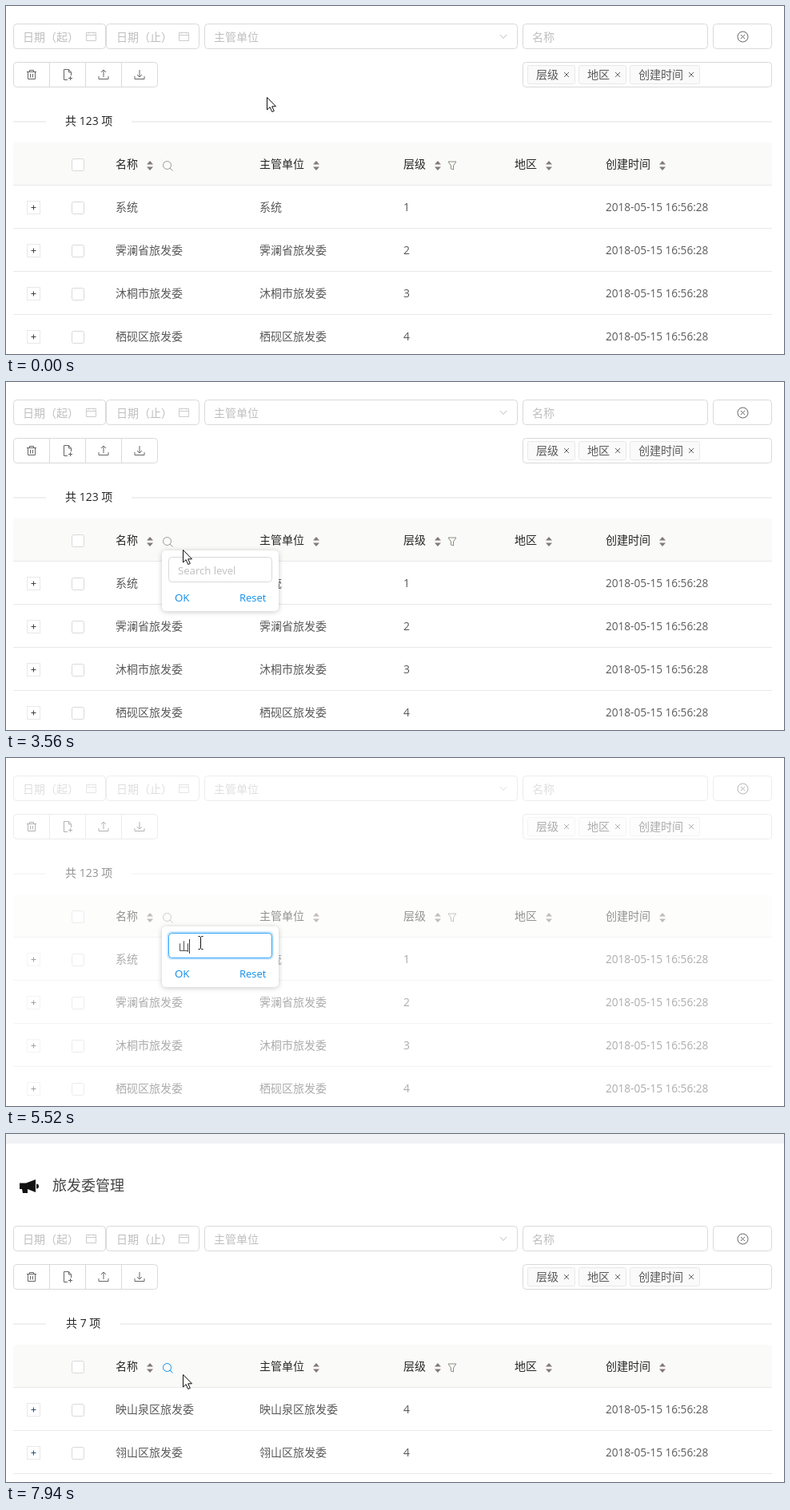
An HTML page that plays this animation: 973 by 436 pixels, repeating every 8000 ms.

```html
<!DOCTYPE html>
<html lang="zh-CN">
<head>
<meta charset="utf-8">
<title>Table search</title>
<style>
html, body { margin: 0; width: 100%; height: 100%; overflow: hidden; background: #fff; }
svg { display: block; width: 100%; height: 100%; }
text { font-family: "Open Sans", "Noto Sans CJK SC", "Noto Sans CJK", sans-serif; white-space: pre; }
.popup { filter: drop-shadow(0 1px 3px rgba(0, 0, 0, .22)); }
</style>
</head>
<body>
<svg id="stage" viewBox="0 0 973 436"></svg>
<script>
const LOOP = 8000, TICK = 110, SHIFT = 93;
const BORDER = '#d9d9d9', LINE = '#e8e8e8', HINT = '#bfbfbf', BODY = '#595959', DARK = '#262626', BLUE = '#108ee9';

const text = (x, cy, str, fill = BODY, size = 14) =>
  `<text x="${x}" y="${Math.round(cy + size * .36)}" fill="${fill}" font-size="${size}">${str}</text>`;
const rect = (x, y, w, h, fill, extra = '') =>
  `<rect x="${x}" y="${y}" width="${w}" height="${h}" fill="${fill}" ${extra}/>`;
const box = (x, y, w, h, r = 4, stroke = BORDER, fill = '#fff') =>
  rect(x + .5, y + .5, w - 1, h - 1, fill, `rx="${r}" stroke="${stroke}"`);
const icon = (x, y, d, stroke = '#666', fill = 'none') =>
  `<path transform="translate(${x} ${y})" d="${d}" fill="${fill}" stroke="${stroke}"/>`;
const group = (id, content, extra = '') => `<g id="${id}" ${extra}>${content}</g>`;
const circle = r => `M${-r} 0a${r} ${r} 0 1 0 ${2 * r} 0a${r} ${r} 0 1 0 ${-2 * r} 0`;
const cross = r => `M${-r} ${-r}L${r} ${r}M${r} ${-r}L${-r} ${r}`;

const calendar = x => icon(x, 38.5, 'M-6-5H6V5H-6ZM-6-2H6M-3-6V-4M3-6V-4', '#ccc');
const sorter = x => icon(x, 200, 'M-4-1.5L0-6L4-1.5ZM-4 1.5L0 6L4 1.5Z', 'none', '#84787c');

function toolbar() {
  const tags = [[652, 60, '层级'], [716, 60, '地区'], [780, 88, '创建时间']];
  return box(9, 22, 116, 32) + box(125, 22, 117, 32) + box(248, 22, 392, 32) +
    box(646, 22, 232, 32) + box(884, 22, 74, 32) +
    text(21, 38.5, '日期（起）', HINT) + text(138, 38.5, '日期（止）', HINT) +
    text(260, 38.5, '主管单位', HINT) + text(658, 38.5, '名称', HINT) +
    calendar(106.5) + calendar(222.5) + icon(622, 38, 'M-4-2L0 2.5L4-2', HINT) +
    icon(921.5, 38.5, circle(6.5) + cross(2.5)) +
    box(9, 70, 181, 32) + [54, 99, 144].map(x => rect(x, 71, 1, 30, BORDER)).join('') +
    icon(32, 86, 'M-6-3.5H6M-2.5-3.5V-5.5H2.5V-3.5M-4.5-3.5V5.5H4.5V-3.5M-1.5-1V3.5M1.5-1V3.5') +
    icon(77, 86, 'M0 6.5H-4.5V-6.5H1.5L4.5-3V1M1.5-6.5V-3H4.5M3.5 2V7M1 4.5H6') +
    icon(122, 86, 'M-6 2V5.5H6V2M0 3V-6M-3-3L0-6L3-3') +
    icon(167, 86, 'M-6 2V5.5H6V2M0 3V-6M-3 0L0 3L3 0') +
    box(646, 70, 312, 32) + tags.map(([x, w, label]) =>
      box(x, 74, w, 24, 2, LINE, '#fafafa') + text(x + 11, 86, label) +
      icon(x + w - 11, 86, cross(3))).join('');
}

function table(id, rows, searchColor, plusColor) {
  const heads = [[137, '名称', 180], [317, '主管单位', 388], [497, '层级', 540], [636, '地区', 679], [750, '创建时间', 821]];
  const checkbox = cy => box(82, cy - 8, 16, 16, 2);
  return `<path d="M9 224V175a4 4 0 0 1 4-4H954a4 4 0 0 1 4 4V224Z" fill="#fafaf9"/>` +
    rect(9, 224, 949, 1, LINE) + checkbox(199) +
    heads.map(([x, label, sortX]) => text(x, 198, label, DARK) + sorter(sortX)).join('') +
    icon(201.5, 199.5, circle(5) + 'M3.5 3.5L7 7', searchColor) +
    icon(558, 200, 'M-5-5H5L1.5 0V5L-1.5 4V0Z', '#8d8d80') +
    rows.map(([name, level], i) => {
      const cy = 252 + 54 * i;
      return rect(9, cy - 27, 949, 53, '#e6f9ff', `id="${id}${i}" opacity="0"`) +
        rect(9, cy + 26, 949, 1, LINE) +
        box(26, cy - 8, 17, 17, 0, LINE) + icon(34.5, cy + .5, 'M-3 0H3M0-3V3', plusColor) +
        checkbox(cy + 1) + text(137, cy, name) + text(317, cy, name) +
        text(497, cy, level) + text(750, cy, '2018-05-15 16:56:28', BODY, 13.6);
    }).join('');
}

const summary = (label, x, end) => rect(9, 144, 41, 2, '#f0f0f0') +
  rect(end, 144, 958 - end, 2, '#f0f0f0') + text(x, 144, label, DARK);

const fullPage = group('full', toolbar() + summary('共 123 项', 74, 157) + table('row',
  [['系统', 1], ['霁澜省旅发委', 2], ['沐桐市旅发委', 3], ['栖砚区旅发委', 4]], '#999', '#444'));

const foundPage = group('found',
  rect(0, 0, 973, 12, '#f0f2f5') +
  `<path d="M17 61.5H25L37 57V73L27 69V74H21L20 69H17ZM38 62.5a3 3 0 0 1 0 6Z" fill="#111"/>` +
  text(58, 65, '旅发委管理', '#444', 18) +
  group('foundBody', toolbar() + summary('共 7 项', 75, 143) + table('match',
    [['映山泉区旅发委', 4], ['翎山区旅发委', 4]], BLUE, '#2a5580'), `transform="translate(0 ${SHIFT})"`));

const popup = group('popup',
  `<rect class="popup" x="195" y="211" width="146" height="76" rx="5" fill="#fff"/>` +
  group('ring', rect(202, 218, 132, 34, 'none', 'rx="5" stroke="#1890ff" stroke-opacity=".2" stroke-width="2"')) +
  box(203, 219, 130, 32) + group('focus', box(203, 219, 130, 32, 4, '#30a3f5')) +
  group('hint', text(215, 236.5, 'Search level', HINT, 13.15)) +
  group('typed', text(215.5, 236, '山')) +
  rect(215, 227, 1, 18, '#333', 'id="caret"') +
  text(211, 270.5, 'OK', BLUE, 13.3) + text(292, 270.5, 'Reset', BLUE, 13));

const candidates = [[250, '山'], [310, '闪'], [370, '删'], [430, '善'], [490, 'Shadoun'], [605, '扇'], [665, '珊']];
const ime = group('ime', box(233, 248, 521, 44, 0, '#555') + rect(233, 248, 61, 44, '#5b6c61') +
  candidates.map(([x, word], i) =>
    text(x, 271.5, i + 1, i ? '#777' : '#e4e8e5', 12.5) +
    text(x + 11, 270.5, word, i ? '#111' : '#fff', 17)).join('') +
  rect(709, 249, 1, 42, '#555') +
  icon(731.5, 270, circle(8) + 'M-4.5 2Q0 7.5 4.5 2M-3-3.5V-1.5M3-3.5V-1.5', '#222'));

const pointer = group('pointer',
  group('arrow', icon(.5, .5, 'M0 0V15.5L3.6 12.2L6.2 18L8.8 17L6.2 11.3H11Z', '#111', '#fff')) +
  group('beam', icon(.5, .5, 'M-3-8H-1L0-7L1-8H3M0-7V7M-3 8H-1L0 7L1 8H3', '#111')));

document.getElementById('stage').innerHTML = fullPage + foundPage + popup + pointer + ime;

// time, x, y of the mouse hot spot
const path = [
  [230, 326, 114], [1010, 233, 190], [1130, 225, 205], [1220, 215, 235], [1380, 203, 280],
  [1650, 190, 311], [1690, 190, 311], [1890, 188, 324], [2010, 190, 318], [2110, 192, 278],
  [2230, 200, 224], [2430, 209, 209], [2650, 208, 208], [2840, 201, 203], [2980, 207, 208],
  [3200, 214, 209], [3520, 221, 210], [3580, 221, 210], [3970, 243, 231], [6270, 243, 231],
  [6610, 243, 185], [6930, 243, 185], [7700, 228, 251], [7920, 221, 301]];

const clamp = v => Math.max(0, Math.min(1, v));
const within = (t, from, to) => t >= from && t < to;
const fade = (t, on, off, length) => clamp((t - on) / length) * (1 - clamp((t - off) / length));

function mouseAt(t) {
  const next = path.findIndex(p => p[0] > t);
  if (next === 0) return path[0].slice(1);
  if (next < 0) return path[path.length - 1].slice(1);
  const [a, b] = [path[next - 1], path[next]];
  const k = (t - a[0]) / (b[0] - a[0]);
  return [1, 2].map(i => Math.round(a[i] + (b[i] - a[i]) * k));
}

const el = id => document.getElementById(id);
const show = (id, on) => el(id).setAttribute('display', on ? 'inline' : 'none');
const opacity = (id, v) => el(id).setAttribute('opacity', v);

function render(t) {
  const tick = t < 230 ? 0 : 230 + Math.floor((t - 230) / TICK) * TICK;
  const found = t >= 5620, typed = t >= 5400;
  const loading = within(t, 5510, 5840) ? .5 : 1;
  show('full', !found);
  show('found', found);
  opacity('full', loading);
  opacity('foundBody', loading);
  opacity('row0', Math.max(fade(tick, 1150, 1400, 300), fade(tick, 2110, 2230, 300)));
  opacity('row1', fade(tick, 1350, 2110, 300));

  const open = fade(tick, 3120, 6840, 200);
  show('popup', open > 0);
  opacity('popup', open);
  el('popup').setAttribute('transform', `translate(0 ${211 * .2 * (1 - open)}) scale(1 ${.8 + .2 * open})`);
  const focused = within(t, 4090, 6940);
  show('ring', focused);
  show('focus', focused);
  show('hint', !typed);
  show('typed', typed);
  show('caret', within(t, 4090, 4540) || within(t, 5400, 6290));
  el('caret').setAttribute('x', typed ? 229 : 215);
  show('ime', within(t, 5070, 5400));

  const beam = within(tick, 1500, 1800) || within(tick, 2000, 2090) || within(tick, 3850, 6400);
  show('beam', beam);
  show('arrow', !beam);
  el('pointer').setAttribute('transform', `translate(${mouseAt(tick)})`);
}

const start = performance.now();
(function frame() {
  render((performance.now() - start) % LOOP);
  requestAnimationFrame(frame);
})();
</script>
</body>
</html>
```
